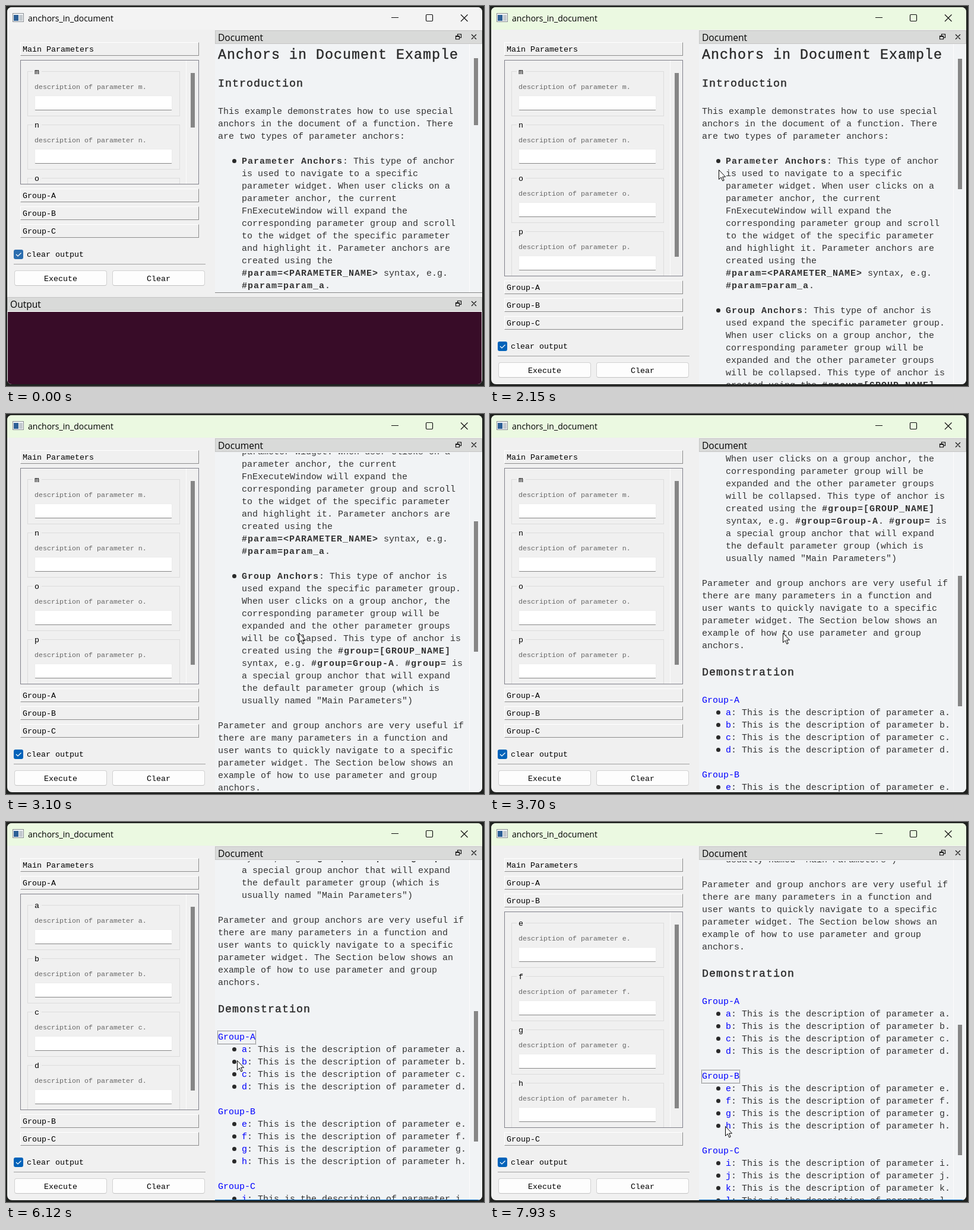
Recreate the animation shown at these times as an HTML page. Size 805x641 px, loop 8 s.

```html
<!DOCTYPE html>
<html lang="en">
<head>
<meta charset="utf-8">
<title>anchors_in_document</title>
<style>
html, body { margin: 0; width: 100%; height: 100%; overflow: hidden; background: #202220; }
#stage { position: absolute; left: 0; top: 0; width: 805px; height: 641px; overflow: hidden; }
#stage div, #stage svg, #stage p, #stage h1, #stage h2 { position: absolute; box-sizing: border-box; margin: 0; white-space: pre; }
#win { inset: 0; background: #f0f0f0; clip-path: inset(2px 3px 3px 2px round 8px); font: 13.333px/25px "Liberation Mono", monospace; color: #000; }
#title { left: 0; top: 0; width: 805px; height: 40px; padding-left: 37px; font: 14px/41px "Open Sans", sans-serif; }
svg { left: 0; top: 0; fill: none; stroke: #111; stroke-width: 1.2; overflow: visible; }

#tools { left: 0; top: 0; }
.head { left: 24px; width: 301px; height: 23px; padding-left: 3px; border: 1px solid #fff; border-color: #fff #8c8c8c #8c8c8c #fff; line-height: 23px; }
.panel { left: 24px; width: 301px; border: 1px solid #80808a; overflow: hidden; }
.panel > .edge { left: 278px; top: 0; width: 1px; height: 100%; background: #fbfbfb; }
.thumb { width: 7px; background: #868686; }
.group { left: 11px; width: 257px; height: 76px; border: 1px solid #dcdcdc; }
.group .name { left: 8px; top: -12px; height: 24px; padding: 0 4px 0 3px; background: #f0f0f0; }
.group .about { left: 11px; top: 14px; font-size: 11.667px; color: #666; }
.group .field { left: 11px; top: 40px; width: 232px; height: 25px; background: #fff; border: 1px solid #ececec; border-bottom-color: #868686; border-radius: 2px; }

#foot { left: 0; top: 411px; width: 350px; height: 70px; }
#check { left: 13px; top: 0; width: 16px; height: 16px; border-radius: 3px; }
#rule { left: 13px; top: 24px; width: 323px; height: 1px; background: #a0a0a0; }
.button { top: 35px; width: 156px; height: 26px; border: 1px solid #d2d2d2; border-bottom-color: #c2c2c2; border-radius: 4px; background: #fdfdfd; text-align: center; line-height: 27px; }

.bar { height: 23px; padding-left: 4px; background: #d9dad9; border: 1px solid #c5c5c5; font: 15.6px/23px "Open Sans", sans-serif; }
#view { left: 352px; top: 64px; width: 450px; background: #f1f3f5; border-bottom: 1px solid #868686; }
#view .edge { left: 428px; top: 0; width: 1px; height: 100%; background: #fcfcfc; }
#clip { left: 0; top: 2px; width: 428px; bottom: 0; overflow: hidden; }
#doc { left: -352px; top: -66px; font-size: 15px; line-height: 21px; color: #333; }
#doc h1, #doc h2 { left: 357px; font-weight: 400; letter-spacing: 1px; color: #2a2a2a; -webkit-text-stroke: .4px #2a2a2a; }
#doc h1 { font-size: 23.333px; line-height: 32px; }
#doc h2 { font-size: 18.333px; line-height: 26px; }
#doc p { left: 357px; }
#doc .item { left: 397px; }
#doc .item::before { content: ""; position: absolute; left: -16px; top: 6px; width: 7px; height: 7px; border-radius: 50%; background: #2a2a2a; }
#doc b { letter-spacing: 1px; }
#doc a { color: #00f; }
#doc .link { display: inline-block; height: 21px; }
#doc .focus { outline: 1px dotted #222; }
#output { inset: 0; }
#console { left: 3px; top: 516px; width: 798px; height: 123px; background: #380c28; }
</style>
</head>
<body>
<div id="stage">
  <div id="win">
    <div id="title">anchors_in_document<svg width="805" height="40">
      <g stroke="none"><path fill="#8a8f94" d="M11 12h19v15H11z"/><path fill="#f4f6f8" d="M12 13h17v13H12z"/>
      <path fill="#2c5f95" d="M13 15h8v10h-8z"/><path fill="#c3c9ce" d="M22 15h6v10h-6z"/></g>
      <rect x="707.5" y="14.5" width="11" height="11" rx="1.5"/>
      <path d="M649 19.500h12M766 14.500l11.500 11.500M777.500 14.500L766 26"/></svg></div>
    <div id="tools"></div>
    <div id="foot">
      <div id="check"><svg width="16" height="16"><path stroke="#fff" d="M4 8l3 3 5.500-5.500"/></svg></div>
      <div style="left:35px;top:-4px">clear output</div>
      <div id="rule"></div>
      <div class="button" style="left:14px">Execute</div>
      <div class="button" style="left:179px">Clear</div>
    </div>
    <div class="bar" style="left:352px;top:41px;width:450px">Document</div>
    <div id="view">
      <div id="clip"><div id="doc"></div></div>
      <div class="edge"></div>
      <div class="thumb" id="thumb" style="left:436px"></div>
    </div>
    <div id="output">
      <div style="left:0;top:484px;width:805px;height:157px;background:#f0f0f0"></div>
      <div class="bar" style="left:2px;top:491px;width:800px">Output</div>
      <div id="console"></div>
    </div>
    <svg width="805" height="641">
      <g id="icons"><path d="M760.500 50v-2.500h6v6H764M757.500 50.500h6v5.500h-6zM757.500 51.500h6M784 48l8 8M792 48l-8 8"/></g>
      <use id="icons2" href="#icons" y="450"/>
    </svg>
  </div>
  <svg id="cursor" width="13" height="20"><path fill="#fff" stroke="#000" stroke-width="1" d="M.5 .5V16.500L4.200 13l2.600 6 2.400-1-2.600-5.800H11.500z"/></svg>
</div>
<script>
const $ = id => document.getElementById(id);
const LOOP = 8000, CLOSE = 780, TINTED = 1660;
const groups = [['Main Parameters', 'mnop'], ['Group-A', 'abcd'], ['Group-B', 'efgh'], ['Group-C', 'ijkl']];

// Document: each block is placed by its top at scroll 0
const block = (tag, cls, top, html) => `<${tag} class="${cls}" style="top:${top}px">${html}</${tag}>`;
const para = (top, text) => block('p', '', top, text);
const item = (top, text) => block('div', 'item', top, text);
$('doc').innerHTML =
  block('h1', '', 67, 'Anchors in Document Example') +
  block('h2', '', 119, 'Introduction') +
  para(168, `This example demonstrates how to use special
anchors in the document of a function. There
are two types of parameter anchors:`) +
  item(252, `<b>Parameter Anchors</b>: This type of anchor
is used to navigate to a specific
parameter widget. When user clicks on a
parameter anchor, the current
FnExecuteWindow will expand the
corresponding parameter group and scroll
to the widget of the specific parameter
and highlight it. Parameter anchors are
created using the
<b>#param=&lt;PARAMETER_NAME&gt;</b> syntax, e.g.
<b>#param=param_a</b>.`) +
  item(504, `<b>Group Anchors</b>: This type of anchor is
used expand the specific parameter group.
When user clicks on a group anchor, the
corresponding parameter group will be
expanded and the other parameter groups
will be collapsed. This type of anchor is
created using the <b>#group=[GROUP_NAME]</b>
syntax, e.g. <b>#group=Group-A</b>. <b>#group=</b> is
a special group anchor that will expand
the default parameter group (which is
usually named "Main Parameters")`) +
  para(756, `Parameter and group anchors are very useful if
there are many parameters in a function and
user wants to quickly navigate to a specific
parameter widget. The Section below shows an
example of how to use parameter and group
anchors.`) +
  block('h2', '', 904, 'Demonstration') +
  groups.slice(1).map(([name, letters], g) => {
    const top = 953 + 126 * g;
    return para(top, `<a class="link">${name}</a>`) + [...letters].map((c, i) =>
      item(top + 21 * (i + 1), `<a>${c}</a>: This is the description of parameter ${c}.`)).join('');
  }).join('');
const links = document.querySelectorAll('.link');

// Toolbox with one open group
function toolbox(open, height) {
  const top = 91 + 30 * open;
  const heads = groups.map(([name], i) =>
    block('div', 'head', i <= open ? 61 + 30 * i : top + height + 7 + 30 * (i - open - 1), name));
  const fields = [...groups[open][1]].map((c, i) => block('div', 'group', 18 + 90 * i,
    `<div class="name">${c}</div><div class="about">description of parameter ${c}.</div><div class="field"></div>`));
  return heads.join('') + `<div class="panel" style="top:${top}px;height:${height}px">${fields.join('')}
    <div class="edge"></div><div class="thumb" style="left:286px;top:21px;height:${height === 365 ? 310 : 92}px"></div></div>`;
}

const notches = [2830, 2960, 3030, 3100, 3170, 3300, 3370, 3700, 3770, 3900, 7660];
const path = [
  [0, 806, 645], [70, 804, 640], [600, 788, 502], [1000, 787, 502], [1240, 783, 510],
  [1660, 482, 443], [2020, 338, 300], [2250, 420, 258], [2430, 470, 362],
  [2690, 470, 362], [2760, 493, 369], [3960, 493, 369], [4460, 385, 372],
  [4780, 385, 372], [4850, 381, 360], [6050, 381, 360], [6120, 389, 402],
  [6400, 388, 487], [7700, 388, 487], [7930, 396, 513], [8000, 396, 513]
];
const mix = (a, b, k) => a + (b - a) * k;

function pointer(t) {
  const i = path.findIndex(p => p[0] > t);
  const [t0, x0, y0] = path[i - 1], [t1, x1, y1] = path[i];
  const k = (t - t0) / (t1 - t0);
  return [mix(x0, x1, k), mix(y0, y1, k)].map(Math.round);
}

let shown = '';
function draw(now) {
  const t = now % LOOP;
  const closed = t >= CLOSE;
  const open = t < 5260 ? 0 : t < 7130 ? 1 : 2;
  const scroll = 60 * notches.filter(n => n <= t).length;

  const key = `${closed} ${open}`;
  if (key !== shown) {
    $('tools').innerHTML = toolbox(open, closed ? 365 : 210);
    shown = key;
  }
  const tint = Math.min(1, Math.max(0, (t - CLOSE) / (TINTED - CLOSE)));
  $('title').style.background = `rgb(${mix(243, 235, tint)},${mix(243, 249, tint)},${mix(243, 225, tint)})`;
  $('check').style.background = closed ? '#0062b9' : '#2b6dae';
  $('foot').style.top = (closed ? 566 : 411) + 'px';
  $('output').style.display = $('icons2').style.display = closed ? 'none' : '';
  $('view').style.height = (closed ? 575 : 420) + 'px';
  $('view').style.borderBottom = t >= 5120 ? '2px solid #0067c0' : '1px solid #868686';
  $('doc').style.transform = `translateY(${-scroll}px)`;
  $('thumb').style.top = (closed ? 25 : 24) + Math.round(scroll * .3833) + 'px';
  $('thumb').style.height = (closed ? 220 : 113) + 'px';
  links[0].classList.toggle('focus', t >= 5120 && t < 6730);
  links[1].classList.toggle('focus', t >= 6730);
  const [x, y] = pointer(t);
  $('cursor').style.transform = `translate(${x}px,${y}px)`;
}

const start = performance.now();
function tick() {
  draw(performance.now() - start);
  requestAnimationFrame(tick);
}
tick();
</script>
</body>
</html>
```
